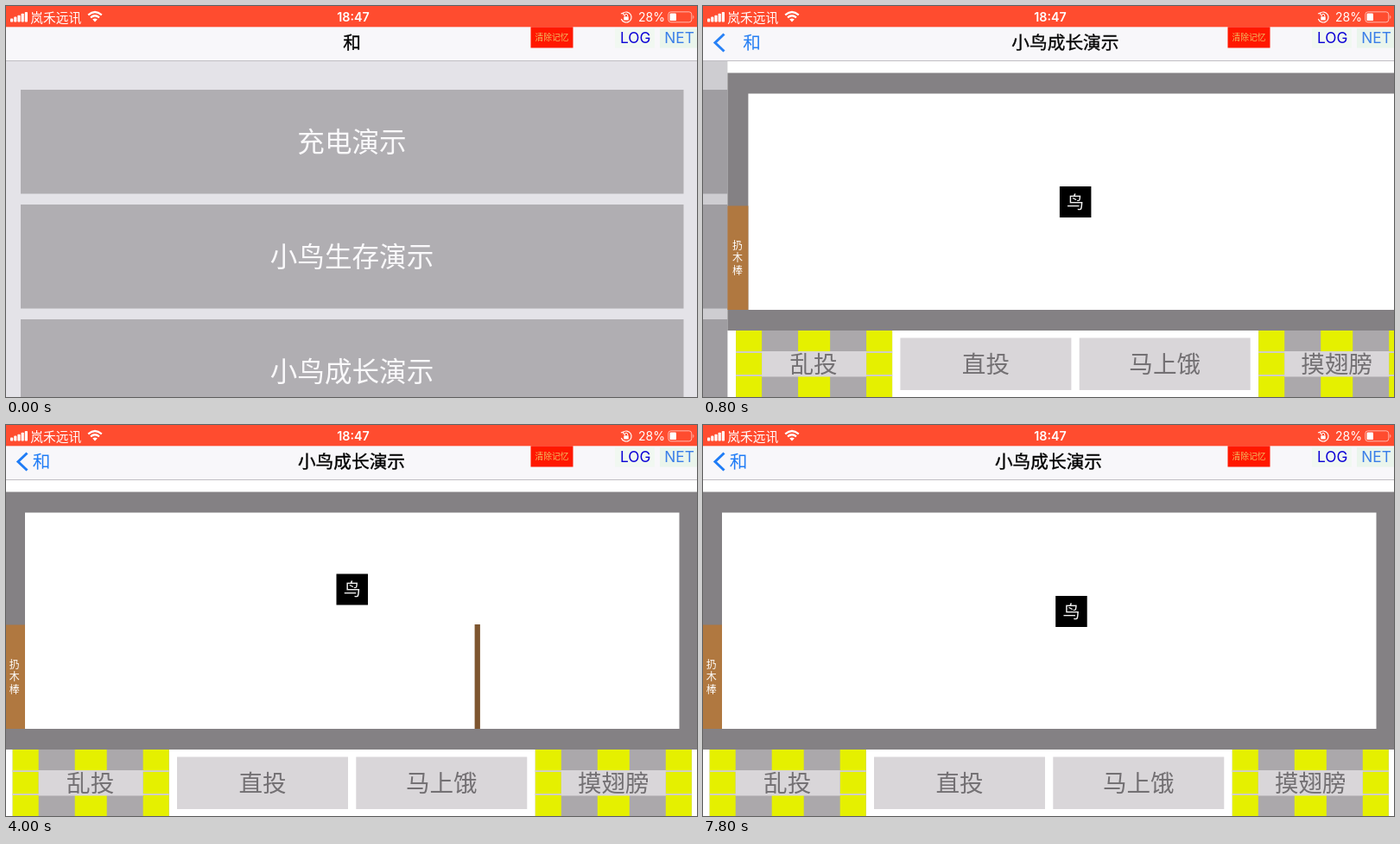
An HTML page that plays this animation: 800 px wide and 453 px high, repeating every 8000 ms.

```html
<!DOCTYPE html>
<html lang="zh">
<head>
<meta charset="utf-8">
<title>小鸟成长演示</title>
<style>
  html, body { margin: 0; width: 100%; height: 100%; overflow: hidden; background: #fff; }
  svg { display: block; width: 100vw; height: 100vh; }
  text { font-family: Inter, "Noto Sans CJK SC", "Noto Sans CJK", sans-serif; }
</style>
</head>
<body>
<svg id="stage" viewBox="0 0 800 453">
  <defs>
    <radialGradient id="shine" gradientUnits="userSpaceOnUse" cx="10" cy="296" r="56">
      <stop offset="0" stop-color="#fff" stop-opacity=".6"/>
      <stop offset=".5" stop-color="#fff" stop-opacity=".3"/>
      <stop offset="1" stop-color="#fff" stop-opacity="0"/>
    </radialGradient>
  </defs>
  <g id="home"></g>
  <rect id="dim" y="63" width="800" height="390"/>
  <g id="page"></g>
  <g id="nav"></g>
  <g id="status"></g>
</svg>
<script>
const LOOP = 8000, STEP = 200;
const $ = id => document.getElementById(id);

function add(parent, tag, attrs, content) {
  const node = document.createElementNS("http://www.w3.org/2000/svg", tag);
  for (const key in attrs) node.setAttribute(key, attrs[key]);
  if (content) node.textContent = content;
  return parent.appendChild(node);
}
const group = parent => add(parent, "g", {});
const rect = (parent, x, y, width, height, fill) =>
  add(parent, "rect", { x, y, width, height, fill });
const line = (parent, d, stroke, width) =>
  add(parent, "path", { d, fill: "none", stroke, "stroke-width": width });

// Text centred on a point
const label = (parent, content, x, y, size, fill, extra) =>
  add(parent, "text", { x, y: y + size * 0.38, "font-size": size, fill,
    "text-anchor": "middle", ...extra }, content);

const move = (node, x, y = 0) => node.setAttribute("transform", `translate(${x} ${y})`);
const fade = (node, value) => node.setAttribute("opacity", value);

// Menu screen
const home = $("home");
rect(home, 0, 63, 1040, 390, "#e4e3e8");
const rows = ["充电演示", "小鸟生存演示", "小鸟成长演示"].map((name, i) => {
  const y = 97 + i * 133;
  rect(home, 17, y, 767.5, 120.5, "#b0aeb2");
  return label(home, name, 400.5, y + 60, 31.6, "#faf9fb");
});

// Cage screen
const page = $("page");
rect(page, -2, 63, 804, 390, "#fff");
rect(page, -2, 77.5, 804, 298.5, "#848184");
rect(page, 22, 101.5, 757.5, 250.5, "#fff");

rect(page, -2, 231.5, 24, 120.5, "#b07840");
const glow = rect(page, -2, 231.5, 24, 120.5, "url(#shine)");
[..."扔木棒"].forEach((c, i) => label(page, c, 9.7, 277 + i * 14.5, 12, "#fff"));
const stick = rect(page, 0, 231, 6.3, 121, "#7e5630");

const bird = group(page);
rect(bird, 382.5, 209, 36.5, 36, "#000");
label(bird, "鸟", 400.7, 227, 20, "#f2f2f2");

function checker(x) {
  rect(page, x, 376, 181, 77, "#aba8ab");
  for (const [dx, w] of [[0, 30], [72, 37], [151, 30]]) rect(page, x + dx, 376, w, 77, "#e5f000");
  for (const y of [400, 427]) rect(page, x, y, 181, 2, "#d0cec4");
  rect(page, x + 30, 400, 121, 29.5, "#d9d6d9");
}
checker(7.7);
checker(612.8);
rect(page, 198, 384.5, 198, 60.5, "#d9d6d9");
rect(page, 405.3, 384.5, 198, 60.5, "#d9d6d9");
["乱投", "直投", "马上饿", "摸翅膀"].forEach((name, i) =>
  label(page, name, [97.7, 297, 504.3, 703.3][i], 414.5, 27.6, "#737073"));

// Navigation bar
const nav = $("nav");
const heavy = { "font-weight": 500, stroke: "#000", "stroke-width": 0.35 };
rect(nav, 0, 24, 800, 39, "#f8f7fa");
rect(nav, 0, 63, 800, 1, "#c0bec3");
const chevron = line(nav, "M24.5 32.5L14 42.5L24.5 52.5", "#1f7cf6", 3);
const back = group(nav);
const backDark = label(back, "和", 0, 42.5, 20.7, "#000", heavy);
const backBlue = label(back, "和", 0, 42.5, 20.7, "#1f7cf6");
const title = label(nav, "小鸟成长演示", 400, 42.5, 20.7, "#000", heavy);

// Status bar and floating tools
const status = $("status");
rect(status, 0, 0, 800, 24.3, "#ff4c2f");
for (let i = 0; i < 5; i++) {
  const h = 4 + i * 1.9;
  add(status, "rect", { x: 5 + i * 4.2, y: 18.5 - h, width: 3.2, height: h, rx: 0.8, fill: "#fff" });
}
label(status, "岚禾远讯", 57.7, 13, 14.7, "#fff");
line(status, "M95.2 10.3Q103 3.7 110.8 10.3M98 13.3Q103 9.2 108 13.3", "#fff", 2.2);
add(status, "path", { d: "M100.2 15.6Q103 13.3 105.8 15.6L103 18.6Z", fill: "#fff" });
label(status, "18:47", 402, 13, 14.3, "#fff", { "font-weight": 600 });
line(status, "M714.2 8.4A6 6 0 1 1 712.4 15M712 9L714.6 8L715.2 10.8", "#fff", 1.2);
rect(status, 715.3, 12.4, 5.4, 4, "#fff");
line(status, "M716.3 12.5V11A1.7 1.7 0 0 1 719.7 11V12.5", "#fff", 1);
label(status, "28%", 747.5, 13, 14, "#fff");
add(status, "rect", { x: 766.8, y: 6.8, width: 27, height: 12, rx: 3,
  fill: "none", stroke: "#fff", "stroke-opacity": 0.6, "stroke-width": 1 });
add(status, "rect", { x: 768.5, y: 8.5, width: 7.5, height: 8.6, rx: 1.2, fill: "#fff" });
add(status, "path", { d: "M795.3 10.5Q797.6 12.8 795.3 15.1Z", fill: "#fff", opacity: 0.6 });

rect(status, 607.5, 24.3, 49, 24.2, "#ff1800");
label(status, "清除记忆", 632, 36.5, 9.8, "#f0bd62");
rect(status, 705, 26, 46, 22.5, "#f1f8f1");
rect(status, 757, 26, 43, 22.5, "#eaf5ec");
label(status, "LOG", 728.7, 36.8, 17.3, "#0b00d6");
label(status, "NET", 779.5, 36.8, 17.3, "#3a7ee8");

function birdOffset(t) {
  if (t < 2800) return [0, 0];
  return t < 7800 ? [0, -36.5] : [25.7, -11];
}

function draw(time) {
  const t = Math.floor(time % LOOP / STEP) * STEP;

  // Remaining share of the push transition
  const left = t < 600 ? 1 : t >= 1200 ? 0 : Math.exp(-0.00935 * (t - 450));
  const done = 1 - left;
  move(home, -240 * done);
  $("dim").setAttribute("opacity", 0.1 * done);
  move(page, 802 * left);
  fade(rows[2], t >= 400 ? 0.4 : 1);

  fade(chevron, done);
  move(back, Math.min(400.7, 41 + 410 * left));
  fade(backDark, left);
  fade(backBlue, done);
  move(title, 512 * left);
  fade(title, left === 1 ? 0 : 1 - 0.8 * left);

  move(bird, ...birdOffset(t));
  const flying = t >= 2800 && t < 4800;
  fade(stick, flying ? 1 : 0);
  stick.setAttribute("x", 45.2 + Math.max(0, t - 2800) * 0.4145);
  fade(glow, t === 2800 ? 1 : 0);
}

const start = performance.now();
function tick() {
  draw(performance.now() - start);
  requestAnimationFrame(tick);
}
tick();
</script>
</body>
</html>
```
